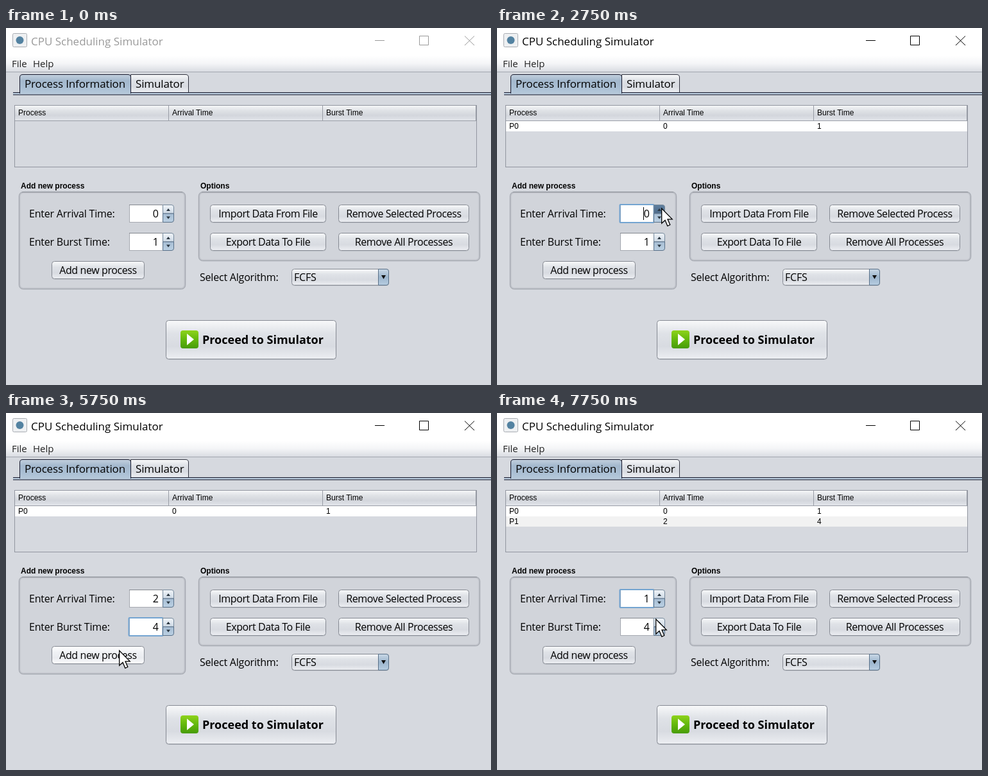
Animation, 756 px wide and 556 px high, one loop 8000 ms. Source, as an HTML page:

```html
<!DOCTYPE html>
<html lang="en">
<head>
<meta charset="utf-8">
<title>CPU Scheduling Simulator</title>
<style>
html, body { margin: 0; width: 100%; height: 100%; overflow: hidden; background: #d6d9df; }
svg { display: block; width: 756px; height: 556px; }
text { font: 16px "Open Sans", "Noto Sans", sans-serif; fill: #000; white-space: pre; }
.title { font-size: 17px; }
.menu { font-size: 15px; fill: #222; }
.tab { font-size: 17px; letter-spacing: -.15px; }
.label { letter-spacing: -.2px; }
.button { letter-spacing: -.4px; text-anchor: middle; }
.value { text-anchor: end; }
.cell, .head { font: 12px "Liberation Sans", Arial, sans-serif; }
.head { font-weight: bold; }
.go { font-size: 18px; font-weight: bold; }
</style>
</head>
<body>
<svg viewBox="0 0 756 556">
  <defs id="defs"></defs>
  <g id="scene"></g>
</svg>
<script>
const LOOP = 8000, STEP = 250;

const gradients = {
  menu: ['#fff', '#f4f5f7', '#d9dce2'],
  button: ['#f8f9fa', '#dfe2e7', '#d8dbe1', '#eceef2'],
  hover: ['#fff', '#f0f2f5', '#e9ebef', '#fdfdfe'],
  pressed: ['#8f9cac', '#a9b5c4', '#bcc6d2'],
  tab: ['#c3d0de', '#a3b8cd', '#a9bed3', '#b5c8da'],
  head: ['#f5f6f7', '#dfe2e6', '#d3d6dc', '#e2e5ea'],
  up: ['#f0f4f8', '#cdd9e5'],
  down: ['#a6bdd3', '#bbd0e3'],
  hot: ['#60809f', '#4c6a8a'],
  arrow: ['#c9d8e6', '#9db6ce', '#b6cce0'],
  go: ['#8ed31c', '#64b80d', '#479c08']
};
document.getElementById('defs').innerHTML = Object.entries(gradients).map(([id, colors]) =>
  `<linearGradient id="${id}" x2="0" y2="1">${colors.map((c, i) =>
    `<stop offset="${i / (colors.length - 1)}" stop-color="${c}"/>`).join('')}</linearGradient>`).join('');

const rect = (x, y, w, h, fill, stroke = 'none', r = 0, sw = 1) =>
  `<rect x="${x}" y="${y}" width="${w}" height="${h}" rx="${r}" fill="${fill}" stroke="${stroke}" stroke-width="${sw}"/>`;
const path = (d, fill = 'none', stroke = 'none', sw = 1) =>
  `<path d="${d}" fill="${fill}" stroke="${stroke}" stroke-width="${sw}"/>`;
const text = (x, y, s, type) => `<text x="${x}" y="${y}" class="${type}">${s}</text>`;

function button(x, y, w, h, label, look = 'button', focus = false) {
  return (focus ? rect(x - .5, y - .5, w + 1, h + 1, 'none', '#73a4d1', 5, 2) : '') +
    rect(x + .5, y + 1.5, w - 1, h - 1, 'none', '#c0c4cb', 4) +
    rect(x + .5, y + .5, w - 1, h - 1, `url(#${look})`, focus ? '#5c7f9f' : '#868a93', 4) +
    text(x + w / 2, y + h / 2 + 6, label, 'button');
}

function panel(x, y, w, h) {
  return rect(x + 1, y + 1, w - 2, h - 2, '#d1d4da', '#bfc2c9', 6, 3) +
    rect(x + .5, y + .5, w - 1, h - 1, 'none', '#a4a8b0', 6) +
    path(`M${x + 5} ${y + .5}H${x + w - 5}`, 'none', '#888c94');
}

function spinner(y, value, focus, hot, caret) {
  const upLook = hot === 'up' ? 'hot' : 'up';
  const downLook = hot === 'down' ? 'up' : 'down';
  return rect(192.5, y + .5, 52, 27, '#fff', '#a5a9b0') +
    path(`M192 ${y + .5}H244`, 'none', '#83878e') +
    (focus ? rect(191.5, y, 53, 28, 'none', '#73a4d1', 1, 2) : '') +
    path(`M244.5 ${y + .5}H258q3.500 0 3.500 3.500V${y + 14}H244.500Z`, `url(#${upLook})`, '#75889b') +
    path(`M244.500 ${y + 14}H261.500V${y + 24}q0 3.500 -3.500 3.500H244.500Z`, `url(#${downLook})`, '#586f87') +
    path(`M250 ${y + 10}h6l-3 -4ZM250 ${y + 18.5}h6l-3 4Z`, '#28343f') +
    (caret ? path(`M228.500 ${y + 4}V${y + 24}`, 'none', '#000') : '') +
    text(238, y + 20, value, 'value');
}

function windowBar(active) {
  const ink = active ? '#000' : '#999';
  return rect(0, 0, 756, 43, '#fff') +
    rect(10.5, 8.5, 22, 21, '#eef0f2', '#a9adb3', 2) +
    '<circle cx="21.500" cy="19" r="6" fill="#5382a1"/>' +
    `<g fill="${ink}">${text(39, 27, 'CPU Scheduling Simulator', 'title').replace('<text', `<text style="fill:${ink}"`)}</g>` +
    path('M575 19.500H590M644.500 12.500h14v14h-14ZM715 12.500l15 14.500M730 12.500l-15 14.500', 'none', ink) +
    rect(0, 43, 756, 25, 'url(#menu)') + path('M0 68.500H756', 'none', '#a3a7af') +
    text(9, 61, 'File', 'menu') + text(42, 61, 'Help', 'menu');
}

function tabs() {
  return rect(11, 101, 745, 3, '#b9cadb') +
    path('M194.500 100V72.500H280q4.500 0 4.500 4.500V100', 'url(#button)', '#30323e') +
    path('M11 100.500H756M11 104H756', 'none', '#15172b') +
    path('M21.500 102V77q0 -4.500 4.500 -4.500H190q4.500 0 4.500 4.500V102', 'url(#tab)', '#15172b') +
    text(29, 93, 'Process Information', 'tab') + text(202, 93, 'Simulator', 'tab');
}

function table(rows) {
  const cells = (y, values) => values.map((v, i) => text(19 + 240 * i, y, v, 'cell')).join('');
  const data = [['P0', 0, 1], ['P1', 2, 4]].slice(0, rows);
  return rect(13.5, 120.5, 720, 96, 'none', '#9296a0') +
    rect(14, 121, 719, 23, 'url(#head)') +
    path('M14 144.500H733M253.500 121V144M493.500 121V144M732.500 121V144', 'none', '#999da6') +
    cells(136, ['Process', 'Arrival Time', 'Burst Time']) +
    data.map((d, i) => rect(14, 145 + 16 * i, 719, 16, i ? '#f2f2f2' : '#fff') + cells(157 + 16 * i, d)).join('');
}

function form(s) {
  return text(23, 250, 'Add new process', 'head') + panel(20, 255, 260, 152) +
    text(36, 295, 'Enter Arrival Time:', 'label') + text(36, 339, 'Enter Burst Time:', 'label') +
    spinner(275, s.arrival, s.focus === 'arrival', s.hotArrival, s.caret) +
    spinner(319, s.burst, s.focus === 'burst', s.hotBurst) +
    button(71, 363, 145, 28, 'Add new process', s.add, s.focus === 'add');
}

function options() {
  return text(303, 250, 'Options', 'head') + panel(300, 255, 439, 108) +
    button(318, 275, 181, 28, 'Import Data From File') +
    button(518, 275, 204, 28, 'Remove Selected Process') +
    button(318, 319, 181, 28, 'Export Data To File') +
    button(518, 319, 204, 28, 'Remove All Processes') +
    text(302, 394, 'Select Algorithm:', 'label') +
    button(445, 375, 152, 26, '') + text(449, 394, 'FCFS', 'label') +
    path('M580.500 375.500H593q3.500 0 3.500 3.500V397q0 3.500 -3.500 3.500H580.500Z', 'url(#arrow)', '#586f87') +
    path('M585 385h7l-3.500 6Z', '#111') +
    button(249, 455, 266, 61, '') +
    rect(272, 471, 28, 28, 'url(#go)', 'none', 4) +
    path('M282 476v18l11 -9Z', '#fff') +
    text(306, 492, 'Proceed to Simulator', 'go');
}

const pointer = ([x, y]) => `<g transform="translate(${x} ${y})">` +
  path('M.700 1V24.300L6 19.300 9.800 28.300 13.800 26.500 10 17.800H17.200Z', '#fff', '#000', 1.3) + '</g>';

// Each entry changes part of the state at its time.
const script = [
  [0, { active: false, rows: 0, arrival: 0, burst: 1, add: 'button' }],
  [500, { at: [239, 287] }],
  [750, { at: [236, 297] }],
  [1000, { at: [215, 333] }],
  [1250, { at: [183, 364], add: 'hover' }],
  [1500, { at: [176, 369] }],
  [1750, { active: true, add: 'pressed', focus: 'add' }],
  [2000, { rows: 1, add: 'hover' }],
  [2250, { at: [202, 346], add: 'button' }],
  [2500, { at: [248, 291] }],
  [2750, { at: [256, 280], focus: 'arrival', hotArrival: 'up', caret: true }],
  [3000, { arrival: 1, caret: false }],
  [3250, { arrival: 2 }],
  [3500, { at: [259, 289], hotArrival: '' }],
  [3750, { at: [253, 314] }],
  [4000, { at: [250, 325] }],
  [4250, { burst: 2, focus: 'burst', hotBurst: 'up' }],
  [4500, { burst: 3 }],
  [4750, { burst: 4 }],
  [5000, { at: [223, 347], hotBurst: '' }],
  [5250, { at: [176, 369], add: 'hover' }],
  [6000, { add: 'pressed', focus: 'add' }],
  [6250, { rows: 2, add: 'hover' }],
  [6500, { at: [206, 341], add: 'button' }],
  [6750, { at: [246, 297], hotArrival: 'down' }],
  [7000, { arrival: 1, focus: 'arrival' }],
  [7500, { at: [249, 308], hotArrival: '' }],
  [7750, { at: [247, 320] }]
];

const scene = document.getElementById('scene');
let shown = -1;

function frame(now) {
  const step = Math.floor(now % LOOP / STEP);
  if (step !== shown) {
    shown = step;
    const s = Object.assign({}, ...script.filter(([t]) => t <= step * STEP).map(e => e[1]));
    scene.innerHTML = rect(0, 0, 756, 556, '#d6d9df') + windowBar(s.active) + tabs() +
      table(s.rows) + form(s) + options() + (s.at ? pointer(s.at) : '');
  }
  requestAnimationFrame(frame);
}
frame(performance.now());
</script>
</body>
</html>
```
